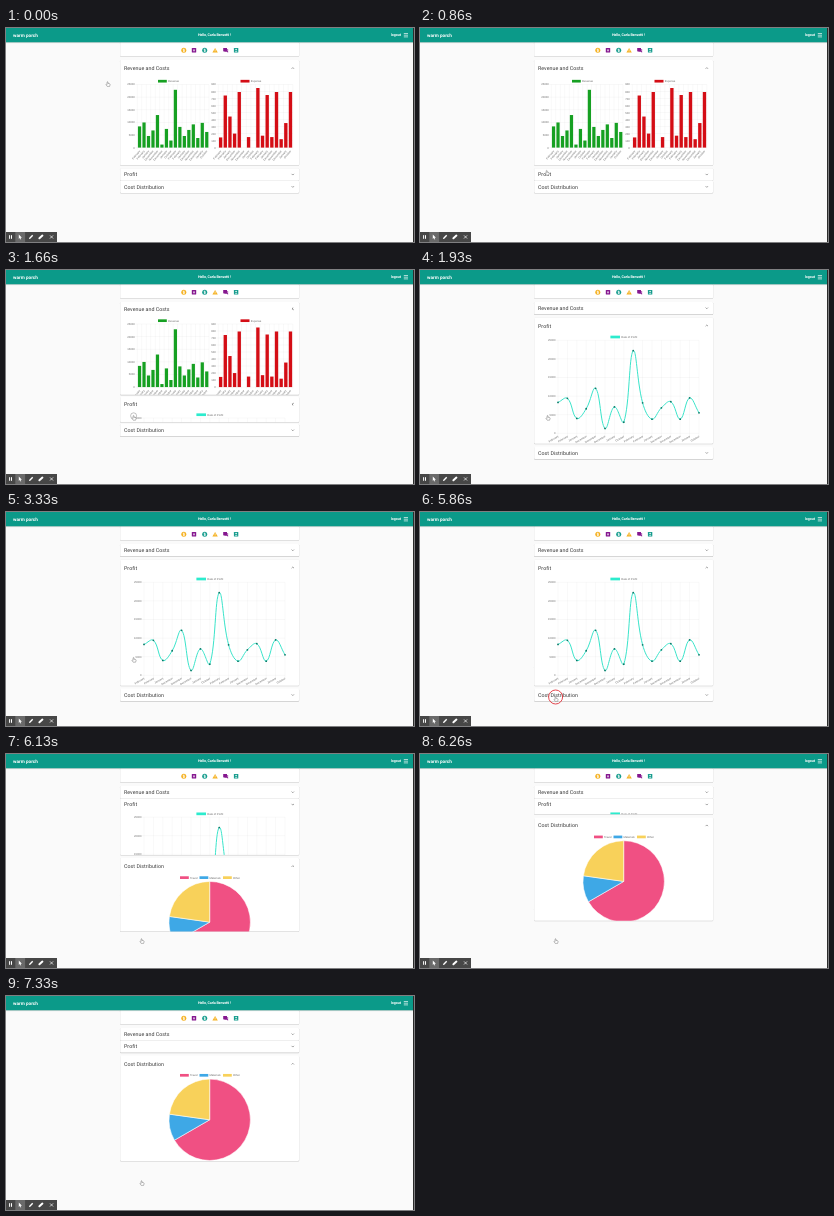
Recreate the animation shown at these times as an HTML page. Size 408 px wide and 214 px high, loop 8 s.

```html
<!DOCTYPE html>
<html lang="en">
<head>
<meta charset="utf-8">
<title>Dashboard</title>
<style>
  html, body { margin: 0; width: 100%; height: 100%; overflow: hidden; background: #fafafa; }
  svg { display: block; }
  text { text-rendering: geometricPrecision; }
  .bar { font: 700 4.7px Roboto, sans-serif; font-stretch: 75%; fill: #fff; }
  .bar .small { font-size: 3.7px; letter-spacing: -.12px; }
  .title { font: 400 5.3px Roboto, sans-serif; letter-spacing: .03px; fill: #3c3c3c; }
  .chart { font: 2.75px "Liberation Sans", Arial, sans-serif; fill: #666; }
  .grid { stroke: #000; stroke-opacity: .11; stroke-width: .28; fill: none; }
</style>
</head>
<body>
<svg id="stage" width="408" height="214" viewBox="0 0 408 214"></svg>
<script>
const LOOP = 8000, OPEN_PROFIT = 1601, OPEN_COST = 5997;
const LEFT = 114.2, WIDTH = 178.8, TOP = 32, ROW = 12.3, GROW = 4.1, GAP = 3.1;
const MONTHS = ["February", "February", "January", "December", "November", "December", "January", "October"];
const REVENUE = [8400, 9960, 4600, 6800, 12900, 1200, 7400, 2800, 22900, 8200, 4600, 7000, 9200, 3800, 9800, 6200];
const EXPENSE = [145, 743, 443, 200, 793, 0, 150, 0, 850, 170, 750, 150, 793, 120, 350, 793];
const PROFIT = [8300, 9400, 4000, 6600, 12100, 1300, 7100, 3000, 22200, 8200, 3800, 6850, 8500, 3800, 9500, 5500];

const text = (x, y, s, extra = "") => `<text x="${x}" y="${y}" ${extra}>${s}</text>`;
const rect = (x, y, w, h, fill, extra = "") =>
  `<rect x="${x}" y="${y}" width="${w}" height="${h}" fill="${fill}" ${extra}/>`;
const path = (d, extra = "") => `<path d="${d}" ${extra}/>`;
const legend = (x, y, w, color, label) =>
  rect(x, y - 1.35, w, 2.7, color) + text(x + w + 1.2, y + 1, label);

// Horizontal lines with value labels, vertical lines, and slanted month names.
function axes({ x0, x1, y0, y1, max, steps, columns, angle, shift }) {
  let d = "", labels = "";
  for (let i = 0; i <= steps; i++) {
    const y = y1 + (y0 - y1) * i / steps;
    d += `M${x0 - 2} ${y}H${x1}`;
    labels += text(x0 - 2.4, y + 1, max - max * i / steps, 'text-anchor="end"');
  }
  const gap = (x1 - x0) / columns;
  for (let i = 0; i <= columns; i++) d += `M${x0 + gap * i} ${y1}V${y0 + 2}`;
  for (let i = 0; i < 16; i++) {
    const x = x0 + gap * (i + shift) + .8;
    labels += text(0, 0, MONTHS[i % MONTHS.length],
      `text-anchor="end" transform="translate(${x} ${y0 + 3.6}) rotate(${angle})"`);
  }
  return path(d, 'class="grid"') + labels;
}

function barChart(values, x0, x1, max, steps, color) {
  const y0 = 71.2, y1 = 8.1, gap = (x1 - x0) / 16;
  const bars = values.map((v, i) => {
    const h = v / max * (y0 - y1);
    return rect(x0 + gap * (i + .14), y0 - h, gap * .72, h, color);
  }).join("");
  return axes({ x0, x1, y0, y1, max, steps, columns: 16, angle: -50, shift: .5 }) + bars;
}

function lineChart(values) {
  const x0 = 138, x1 = 279, y0 = 99.5, y1 = 6.5, max = 25000;
  const pts = values.map((v, i) => [x0 + (x1 - x0) * i / 15, y0 - v / max * (y0 - y1)]);
  const handles = pts.map((p, i) => {
    const a = pts[i - 1] || p, b = pts[i + 1] || p;
    const da = Math.hypot(p[0] - a[0], p[1] - a[1]), db = Math.hypot(b[0] - p[0], b[1] - p[1]);
    const ka = .4 * da / (da + db), kb = .4 * db / (da + db);
    return {
      before: [p[0] - ka * (b[0] - a[0]), p[1] - ka * (b[1] - a[1])],
      after: [p[0] + kb * (b[0] - a[0]), p[1] + kb * (b[1] - a[1])]
    };
  });
  let d = `M${pts[0]}`;
  for (let i = 1; i < pts.length; i++) d += `C${handles[i - 1].after} ${handles[i].before} ${pts[i]}`;
  return axes({ x0, x1, y0, y1, max, steps: 5, columns: 15, angle: -30, shift: 0 }) +
    path(d, 'fill="none" stroke="#3ae4ca" stroke-width="1"') +
    pts.map(p => `<circle cx="${p[0]}" cy="${p[1]}" r=".9" fill="#0a7a68"/>`).join("");
}

function pieChart(cx, cy, r, slices) {
  const at = deg => {
    const a = (deg - 90) * Math.PI / 180;
    return `${cx + r * Math.cos(a)} ${cy + r * Math.sin(a)}`;
  };
  return slices.map(([from, to, color]) =>
    path(`M${cx} ${cy}L${at(from)}A${r} ${r} 0 ${+(to - from > 180)} 1 ${at(to)}Z`,
      `fill="${color}" stroke="#fff" stroke-width=".55"`)).join("");
}

const PINK = "#f05083", BLUE = "#3ea8e6", YELLOW = "#f8d15a", GREEN = "#16a022", RED = "#d40d15";
const panels = [
  {
    title: "Revenue and Costs", size: 88.8, time: 323,
    body: legend(152, 4.8, 8.8, GREEN, "Revenue") + legend(234.5, 4.8, 9, RED, "Expense") +
      barChart(REVENUE, 131.3, 203, 25000, 5, GREEN) + barChart(EXPENSE, 212.3, 286.8, 900, 9, RED)
  },
  {
    title: "Profit", size: 109.9, time: 342,
    body: legend(190.4, 3.2, 9.6, "#2cebcd", "Rate of Profit") + lineChart(PROFIT)
  },
  {
    title: "Cost Distribution", size: 88.8, time: 323,
    body: legend(174, 3.2, 8.8, PINK, "Travel") + legend(193.5, 3.2, 8.8, BLUE, "Materials") +
      legend(217, 3.2, 8.8, YELLOW, "Other") +
      pieChart(203.7, 47.7, 40.7, [[0, 240, PINK], [240, 278, BLUE], [278, 360, YELLOW]])
  }
];

const card = (y, h) =>
  rect(LEFT - .2, y + .3, WIDTH + .4, h + .3, "#000", 'class="shade" rx="1" opacity=".2"') +
  rect(LEFT, y, WIDTH, h, "#fff", 'class="face" rx=".8"');

const panelMarkup = p => `<g class="panel">${card(0, ROW)}
  <g class="head">${text(118, 1.9, p.title, 'class="title"')}
    ${path("M-1.2 -.6L0 .6L1.2 -.6", 'class="arrow" fill="none" stroke="#666" stroke-width=".6"')}</g>
  <svg class="body chart" width="408" height="0">${p.body}</svg></g>`;

const icon = (x, body) => `<g transform="translate(${x} 22.3)">${body}</g>`;
const mark = 'fill="none" stroke="#fff" stroke-width=".6"';
const icons =
  icon(177.8, '<circle r="2.5" fill="#f5b120"/>' + path("M.8 -1H-.6V0H.7V1.1H-.8M0 -1.6V1.7", mark)) +
  icon(188, rect(-2.2, -2.3, 4.4, 4.6, "#85178f", 'rx=".5"') + path("M0 -1.3V1.3M-1 0H1", mark)) +
  icon(198.7, '<circle r="2.5" fill="#159c8d"/>' + path("M.8 -1H-.6V0H.7V1.1H-.8M0 -1.6V1.7", mark)) +
  icon(209.1, path("M0 -2.4L2.7 2.2H-2.7Z", 'fill="#f5b120"') + path("M0 -.9V.7M0 1.1V1.6", mark)) +
  icon(219.6, path("M-2.4 -2.3H1.4V.6H-1.6L-2.4 1.4ZM1.8 -1.3H2.5V2.5L1.6 1.6H-1.4V1H1.8Z", 'fill="#85178f"')) +
  icon(230.1, rect(-2.2, -2.3, 4.4, 4.6, "#159c8d", 'rx=".5"') +
    '<circle cy="-.7" r=".8" fill="#fff"/>' + path("M-1.4 1.5Q0 -.3 1.4 1.5Z", 'fill="#fff"'));

const toolbar = rect(0, 204, 51, 10, "#474747") + rect(9.3, 204, 9.8, 10, "#6a6a6a") +
  path("M3.6 207.2V210.8M5.5 207.2V210.8", 'stroke="#fff" stroke-width="1"') +
  path("M12.8 206.6V211L13.8 210.1L14.5 211.6L15.2 211.2L14.5 209.8H15.9Z", 'fill="#fff"') +
  path("M22.9 211.1L23.3 209.7L26.2 206.8L27.2 207.8L24.3 210.7Z", 'fill="#fff"') +
  path("M33.4 210.3L36.4 207.6", 'stroke="#fff" stroke-width="2" stroke-linecap="round"') +
  path("M44 207.4L47.1 210.5M47.1 207.4L44 210.5", 'stroke="#fff" stroke-width=".7"');

const stage = document.getElementById("stage");
stage.innerHTML = rect(0, 0, 408, 214, "#fafafa") + card(14, 14.2) + icons +
  `<g class="bar">${rect(0, 14, 408, 1.1, "#000", 'opacity=".15"')}${rect(0, 0, 408, 14.25, "#0b9a89")}
    ${text(7, 8.9, "warm porch")}
    ${text(208.4, 8.4, "Hello, Carla Benvotti !", 'class="small" text-anchor="middle"')}
    ${text(385, 8.4, "logout", 'class="small"')}
    ${path("M397.8 5.5H402M397.8 7.2H402M397.8 8.9H402", 'stroke="#fff" stroke-width=".65"')}</g>` +
  panels.map(panelMarkup).join("") + toolbar + rect(407, 0, 1, 214, "#2b2b2b") +
  `<circle id="ring" fill="none"/><g id="hand">${path(
    "M-.9 .3V-2Q-.4 -2.7 0 -2V-.6L1.7 -.2Q2.2 0 2.1 .6L1.6 2.4H-.8L-2 .6Q-1.7 -.2 -.9 .5Z",
    'fill="#fff" stroke="#666" stroke-width=".45" stroke-linejoin="round"')}</g>`;

const nodes = [...stage.querySelectorAll(".panel")].map(g => ({
  g,
  shade: g.querySelector(".shade"), face: g.querySelector(".face"),
  head: g.querySelector(".head"), arrow: g.querySelector(".arrow"), body: g.querySelector(".body")
}));
const ring = document.getElementById("ring"), hand = document.getElementById("hand");

const clamp = v => Math.min(1, Math.max(0, v));
const smooth = v => (v = clamp(v)) * v * (3 - 2 * v);

// cubic-bezier(.4, 0, .2, 1)
function ease(x) {
  if (x <= 0) return 0;
  if (x >= 1) return 1;
  let lo = 0, hi = 1, s = .5;
  for (let i = 0; i < 24; i++) {
    s = (lo + hi) / 2;
    const bx = 1.2 * s * (1 - s) ** 2 + .6 * s * s * (1 - s) + s ** 3;
    if (bx < x) lo = s; else hi = s;
  }
  return s * s * (3 - 2 * s);
}

function openness(i, t, time) {
  const a = ease((t - OPEN_PROFIT) / time), b = ease((t - OPEN_COST) / time);
  return [1 - a, a - b, b][i];
}

function drawPanels(t) {
  let y = TOP, last = 0;
  panels.forEach((p, i) => {
    const wide = openness(i, t, 150), n = nodes[i];
    if (i) y += GAP * Math.max(last, wide);
    last = wide;
    const head = ROW + GROW * wide, body = p.size * openness(i, t, p.time);
    n.g.setAttribute("transform", `translate(0 ${y})`);
    n.face.setAttribute("height", head + body);
    n.shade.setAttribute("height", head + body + .3);
    n.head.setAttribute("transform", `translate(0 ${head / 2})`);
    n.arrow.setAttribute("transform", `translate(286.8 0) rotate(${180 * wide})`);
    n.body.setAttribute("y", head);
    n.body.setAttribute("height", body);
    y += head + body;
  });
}

function drawPointer(t) {
  const a = smooth((t - 60) / 900), b = smooth((t - 4100) / 590);
  const x = 102 + 26 * a + 8 * b, y = 56 + 91.8 * a + 39.2 * b;
  hand.setAttribute("transform", `translate(${x} ${y})`);

  const since = t - (t < 4000 ? OPEN_PROFIT : OPEN_COST) + 140;
  const shown = since >= 0 && since < 230, pressed = since < 145;
  ring.setAttribute("visibility", shown ? "visible" : "hidden");
  ring.setAttribute("cx", x - .4);
  ring.setAttribute("cy", y - 2);
  ring.setAttribute("r", pressed ? 7 : 3);
  ring.setAttribute("stroke", pressed ? "#e0343c" : "#999");
  ring.setAttribute("stroke-width", pressed ? .9 : .6);
}

function frame() {
  const t = performance.now() % LOOP;
  drawPanels(t);
  drawPointer(t);
  requestAnimationFrame(frame);
}
frame();
</script>
</body>
</html>
```
